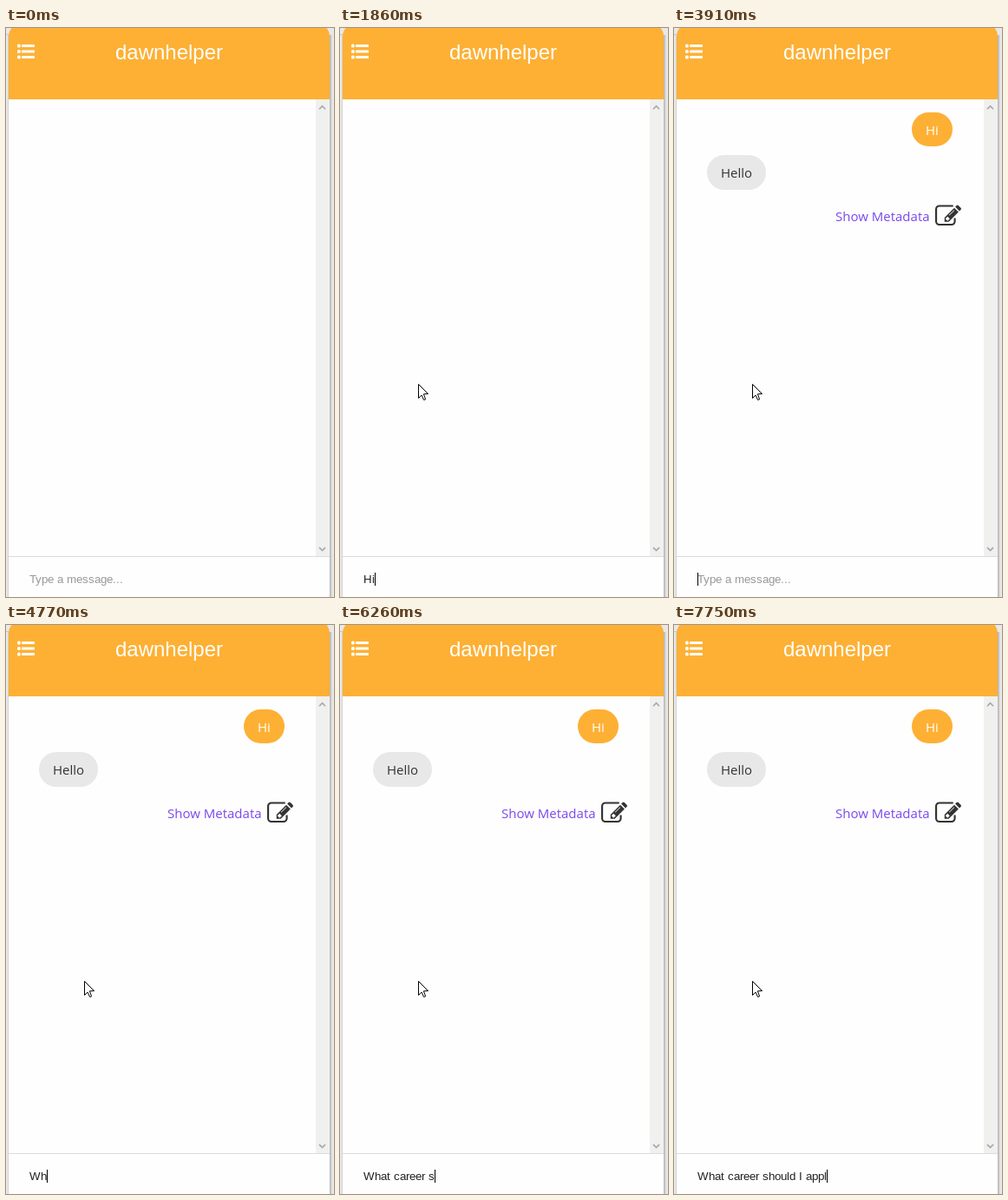
An HTML page with a canvas for the animation above (7.99 s loop, 378 by 654 pixels).

```html
<!DOCTYPE html>
<html lang="en">
<head>
<meta charset="utf-8">
<title>Chat</title>
<style>
html, body { margin: 0; width: 100%; height: 100%; overflow: hidden; background: #fff; }
canvas { display: block; width: 378px; height: 654px; }
</style>
</head>
<body>
<canvas id="stage" width="378" height="654"></canvas>
<script>
const ctx = document.getElementById('stage').getContext('2d');
const LOOP = 7990;
const ORANGE = '#fdb034', PAPER = '#fefefe', DARK = '#333';
const SANS = '"Liberation Sans", Arial, sans-serif';
const CHAT = '15px "Open Sans", sans-serif';
const INPUT = '13.333px ' + SANS;

const SENT = 2110, REPLY = 2270;
const FOCUS = 640, BLINK = 543, KEY_HOLD = 320;

// Typing bursts: characters, start time, time per key
const hi = burst('Hi', 1640, 150);
const question = [
  burst('W', 4060, 0), burst('hat ', 4770, 80), burst('ca', 5400, 230), burst('reer s', 5790, 94),
  burst('hould ', 6420, 94), burst('I ', 7040, 80), burst('appl', 7280, 156)
].flat();

function burst(text, start, step) {
  return [...text].map((ch, i) => ({ ch, at: start + i * step }));
}

function rect(x, y, w, h, color) {
  ctx.fillStyle = color;
  ctx.fillRect(x, y, w, h);
}

function round(x, y, w, h, r, color) {
  ctx.fillStyle = color;
  ctx.beginPath();
  ctx.roundRect(x, y, w, h, r);
  ctx.fill();
}

function label(str, x, y, font, color, align = 'left') {
  ctx.font = font;
  ctx.fillStyle = color;
  ctx.textAlign = align;
  ctx.fillText(str, x, y);
}

function trace(points) {
  ctx.beginPath();
  points.forEach(([x, y]) => ctx.lineTo(x, y));
}

function stroke(width, color) {
  ctx.lineWidth = width;
  ctx.strokeStyle = color;
  ctx.stroke();
}

function fill(color) {
  ctx.fillStyle = color;
  ctx.fill();
}

// Kerned letters on whole pixels; returns the end position
function inputText(str, color) {
  const width = s => ctx.measureText(s).width;
  let x = 27;
  for (let i = 0; i < str.length; i++) {
    label(str[i], x, 638, INPUT, color);
    const next = str[i + 1] || '';
    x += Math.round(width(str[i] + next) - width(next));
  }
  return x;
}

function chevron(y, dir) {
  trace([[361, y - dir * 1.75], [364.5, y + dir * 1.75], [368, y - dir * 1.75]]);
  stroke(1.7, '#a9a9a9');
}

function frame() {
  rect(0, 0, 378, 654, '#e8e8e8');
  rect(0, 7, 3, 1, '#c8c8c8');
  rect(2, 8, 1, 646, '#d2d2d2');
  ['#b8b8b8', '#cbcbcb', '#dcdcdc'].forEach((c, i) => rect(373 + i, 8, 1, 646, c));

  round(3, -6, 370, 88, [16, 16, 0, 0], ORANGE);
  for (let row = 0; row < 3; row++) {
    const y = 19 + row * 6.5;
    round(13, y - 0.4, 3.8, 3.8, 1.5, '#fff');
    round(18, y, 15, 3, 0.4, '#fff');
  }
  label('dawnhelper', 188, 36, '24px ' + SANS, '#fff', 'center');

  rect(3, 82, 370, 572, PAPER);
  rect(357, 82, 16, 525, '#f0f0ef');
  chevron(91.5, -1);
  chevron(598.8, 1);
  rect(3, 607, 370, 1, '#dcdcdc');
}

function editIcon() {
  ctx.save();
  ctx.translate(301, 201.3);
  ctx.scale(0.0168, 0.0168);

  // Open rounded box
  ctx.beginPath();
  ctx.moveTo(1235, 192);
  ctx.arcTo(64, 192, 64, 1472, 224);
  ctx.arcTo(64, 1472, 1344, 1472, 224);
  ctx.arcTo(1344, 1472, 1344, 1030, 224);
  ctx.lineTo(1344, 1030);
  stroke(128, DARK);

  // Pencil, lying along the x axis from its tip
  ctx.translate(640, 1280);
  ctx.rotate(-Math.PI / 4);
  trace([[0, 0], [204, -204], [1154, -204], [1154, 204], [204, 204]]);
  fill(DARK);
  rect(190, -107, 217, 214, PAPER);
  rect(543, -112, 496, 42, PAPER);
  round(1244, -204, 220, 408, [0, 90, 90, 0], DARK);
  ctx.restore();
}

function messages(t) {
  if (t < SENT) return;
  round(274, 97, 47, 39, 19.5, ORANGE);
  label('Hi', 290, 123, CHAT, '#fff');
  if (t < REPLY) return;
  round(38, 146, 68, 40, 20, '#e8e8e8');
  label('Hello', 54, 172, CHAT, DARK);
  label('Show Metadata', 186, 222, CHAT, '#7a48ee');
  editIcon();
}

function inputRow(t) {
  const pressed = (t < SENT ? hi : question).filter(k => k.at <= t);
  let x = 27;
  if (pressed.length) x = inputText(pressed.map(k => k.ch).join(''), '#222');
  else inputText('Type a message...', '#999');

  const blinkOn = t >= FOCUS && Math.floor((t - FOCUS) / BLINK) % 2 === 0;
  const justTyped = pressed.length && t - pressed[pressed.length - 1].at < KEY_HOLD;
  if (blinkOn || justTyped) rect(x, 626, 1, 15, '#000');
}

function ease(t, from, to) {
  const p = Math.min(1, Math.max(0, (t - from) / (to - from)));
  return p * p * (3 - 2 * p);
}

function iBeam() {
  rect(0, -7, 1, 14, '#000');
  for (const end of [-8, 7]) {
    rect(-3, end, 3, 1, '#000');
    rect(1, end, 3, 1, '#000');
  }
}

function arrow() {
  trace([[0.5, 0.5], [0.5, 16.5], [4, 13], [6.6, 18.5], [8.6, 17.8], [6.4, 11.8], [11.5, 11.5]]);
  ctx.closePath();
  fill('#fff');
  stroke(1, '#000');
}

// Rises into the input, rests, then leaves for the chat area, in 79 ms steps
function pointer(t) {
  if (t < 380) return;
  const at = t - (t - 380) % 79;
  const enter = ease(at, 380, 690), leave = ease(at, 770, 1010);
  const x = 181 - 5 * enter - 86 * leave;
  const y = 649 - 17 * enter - 223 * leave;
  ctx.save();
  ctx.translate(Math.round(x), Math.round(y));
  if (y > 607) iBeam();
  else arrow();
  ctx.restore();
}

function draw(t) {
  frame();
  messages(t);
  inputRow(t);
  pointer(t);
}

const start = performance.now();
function tick() {
  draw((performance.now() - start) % LOOP);
  requestAnimationFrame(tick);
}
tick();
</script>
</body>
</html>
```
